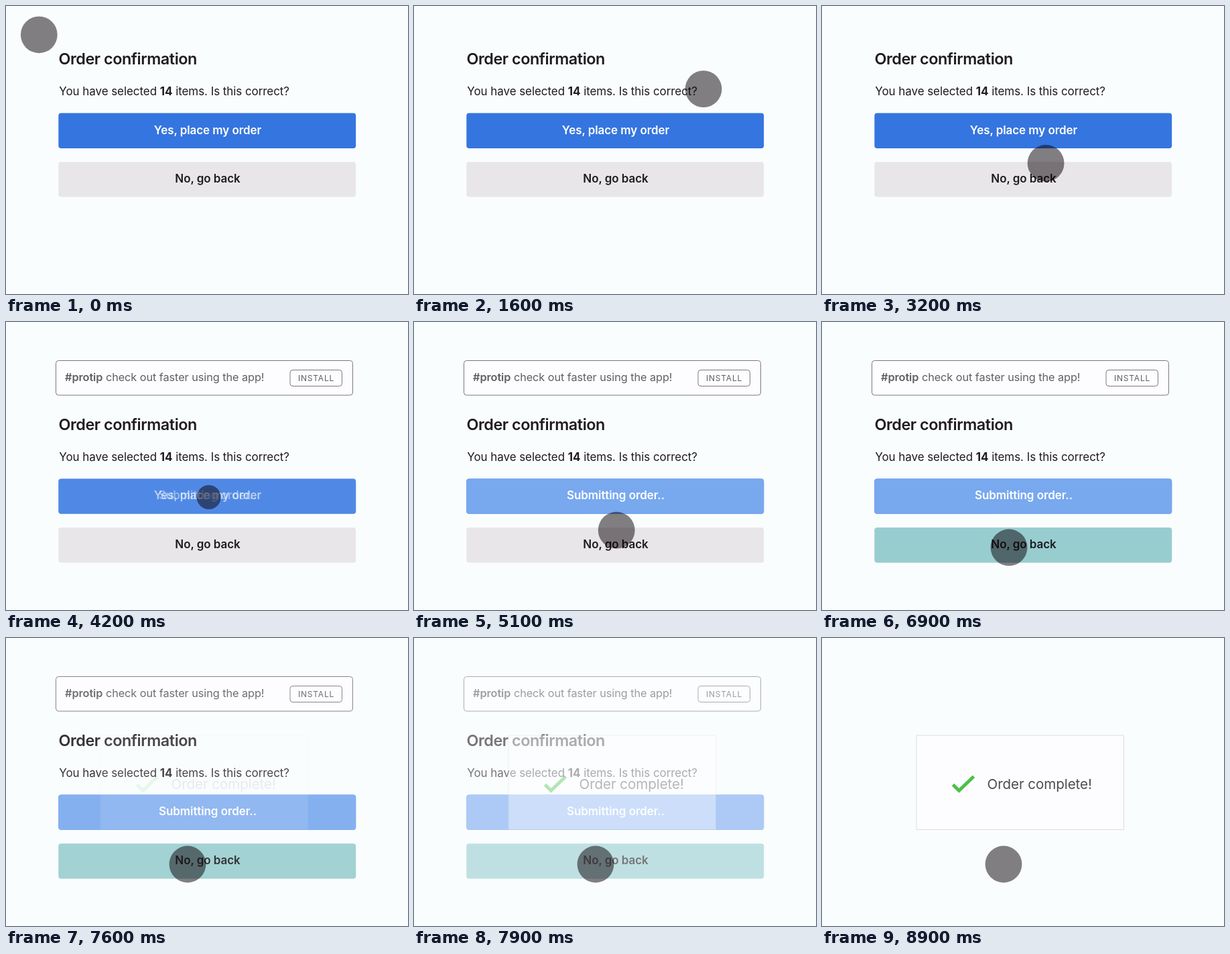
An HTML page for the animation above (9000 ms loop, 600x429 px).

```html
<!DOCTYPE html>
<html lang="en">
<head>
<meta charset="utf-8">
<title>Order confirmation</title>
<style>
  html, body { margin: 0; width: 100%; height: 100%; overflow: hidden; background: #fafdfe; }
  svg { display: block; width: 100%; height: 100%; }
  text { font-family: Inter, Roboto, sans-serif; font-size: 17px; letter-spacing: -.004em; fill: #1f1b20; }
  .bold { font-weight: 700; }
  .heading { font-size: 23.4px; font-weight: 600; letter-spacing: -.02em; }
  .label { font-weight: 600; text-anchor: middle; }
  .light { fill: #fff; }
  .tip { font-size: 16.3px; fill: #615d63; }
  .tip tspan { font-weight: 600; }
  .install { font-size: 12px; letter-spacing: .8px; fill: #615d63; }
  .outline { fill: #fdfdff; stroke: #7c787e; }
  .done { font-size: 20.6px; fill: #4e4b51; }
  .button { x: 78.3px; width: 443.9px; height: 52.3px; rx: 4px; }
</style>
</head>
<body>
<svg viewBox="0 0 600 429">
  <g id="page">
    <g id="banner">
      <rect class="outline" x="74.5" y="57.5" width="443" height="51.5" rx="4"/>
      <text class="tip" x="88" y="88"><tspan>#protip</tspan> check out faster using the app!</text>
      <rect class="outline" x="424" y="71.5" width="77.5" height="24" rx="4"/>
      <text class="install" x="436" y="88">INSTALL</text>
    </g>
    <g id="form">
      <text class="heading" x="78.5" y="87.3">Order confirmation</text>
      <text x="79.3" y="133.2">You have selected <tspan class="bold">14</tspan> items. Is this correct?</text>
      <rect class="button" y="159.6" fill="#3575df"/>
      <rect id="busy" class="button" y="159.6" fill="#78a8ee"/>
      <text id="yesLabel" class="label light" x="301" y="190.6">Yes, place my order</text>
      <text id="busyLabel" class="label light" x="301" y="190.6">Submitting order..</text>
      <rect class="button" y="232.3" fill="#e9e6e9"/>
      <rect id="pressed" class="button" y="232.3" fill="#98cdcf"/>
      <text class="label" x="301" y="263">No, go back</text>
    </g>
  </g>
  <g id="complete">
    <rect x="141" y="145" width="309.5" height="140.5" fill="#fdfcff" stroke="#dcdde0"/>
    <path d="M195.5 218.5L204.5 227.3L226.5 206.3" fill="none" stroke="#4bc148" stroke-width="5"/>
    <text class="done" x="246.5" y="225">Order complete!</text>
  </g>
  <circle id="pointer" fill="#080106" fill-opacity=".5"/>
</svg>
<script>
const LOOP = 9000, STEP = 100, RADIUS = 27.4;
const el = id => document.getElementById(id);
const show = (id, opacity) => el(id).setAttribute('opacity', opacity);

const clamp = u => Math.min(1, Math.max(0, u));
const linear = u => u;
const easeIn = u => u * u;
const easeOut = u => u * (2 - u);
const easeInOut = u => u * u * (3 - 2 * u);
const progress = (t, start, end, ease = linear) => ease(clamp((t - start) / (end - start)));
const press = (t, peak) => easeInOut(clamp(1 - Math.abs(t - peak) / 250));

const home = { x: 49.3, y: 42.8 };
const moves = [
  { start: 500, end: 1000, x: 59, y: 93, ease: easeIn },          // set off
  { start: 1000, end: 1820, x: 461, y: 126, ease: easeOut },      // along the question
  { start: 2700, end: 3400, x: 302.7, y: 261, ease: easeInOut },  // to "No"
  { start: 4600, end: 5400, x: 302, y: 333, ease: easeInOut },    // to "No" again
  { start: 5900, end: 7400, x: 271, y: 337, ease: easeInOut }     // drift off
];

function pointerAt(t) {
  return moves.reduce((from, { start, end, x, y, ease }) => {
    const p = progress(t, start, end, ease);
    return { x: from.x + (x - from.x) * p, y: from.y + (y - from.y) * p };
  }, home);
}

function draw(now) {
  const t = Math.floor(now % LOOP / STEP) * STEP;
  const bannerIn = progress(t, 3500, 3900, easeInOut);
  const busy = progress(t, 4000, 4500);
  const complete = progress(t, 7500, 8500);

  el('form').setAttribute('transform', `translate(0 ${73.9 * bannerIn})`);
  show('banner', bannerIn);
  show('busy', busy);
  show('busyLabel', busy);
  show('yesLabel', 1 - busy);
  show('pressed', progress(t, 5500, 6000, easeOut));
  show('page', 1 - complete);
  show('complete', complete);

  const { x, y } = pointerAt(t);
  const pointer = el('pointer');
  pointer.setAttribute('cx', x);
  pointer.setAttribute('cy', y);
  pointer.setAttribute('r', RADIUS - 9.4 * press(t, 4200) - 7 * press(t, 5800));
}

function frame() {
  draw(performance.now());
  requestAnimationFrame(frame);
}
frame();
</script>
</body>
</html>
```
